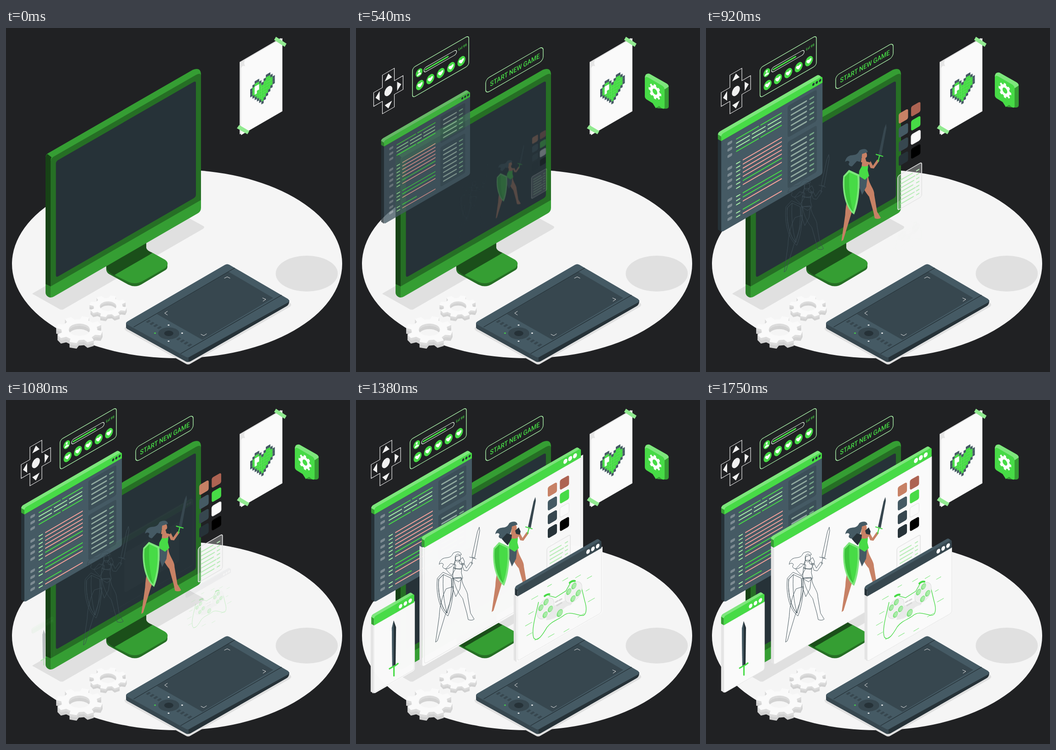
Write an HTML page that moves like this. It is 748 px wide and 748 px high and loops after 1790 ms.

```html
<!DOCTYPE html>
<html lang="en">
<head>
<meta charset="utf-8">
<title>Game design</title>
<style>
  html, body { margin: 0; width: 100%; height: 100%; overflow: hidden; background: #202123; }
  svg { display: block; width: 100vw; height: 100vh; }
  text { font-family: Roboto, "Liberation Sans", sans-serif; font-weight: 500; }
  .sketch * { fill: none; stroke: #3c4c54; stroke-width: .9; }
</style>
</head>
<body>
<svg id="stage" viewBox="0 0 748 748"></svg>
<script>
const GREEN = '#47db46', LIGHT = '#7ee67d', PALE = '#a9f0a8', MID = '#359e33', DEEP = '#266f25';
const SLATE = '#455a64', STEEL = '#37474f', INK = '#263238', SKIN = '#c78165';
const PAPER = '#fafafa', GREY = '#e0e0e0', RIM = '#e6e6e6';
const LOOP = 1790;
const SNAP = [.36, 0, .3, 1.6], SOFT = [.4, 0, .4, 1.4];

const path = (d, fill, more = '') => `<path d="${d}" fill="${fill}" ${more}/>`;
const stroke = (d, color, w = 1) => path(d, 'none', `stroke="${color}" stroke-width="${w}" stroke-linecap="round" stroke-linejoin="round"`);
const rect = (x, y, w, h, fill, r = 0, more = '') => `<rect x="${x}" y="${y}" width="${w}" height="${h}" rx="${r}" fill="${fill}" ${more}/>`;
const oval = (x, y, rx, ry, fill, more = '') => `<ellipse cx="${x}" cy="${y}" rx="${rx}" ry="${ry}" fill="${fill}" ${more}/>`;
const disc = (x, y, r, fill) => oval(x, y, r * .866, r, fill);
const list = (n, make) => Array.from({ length: n }, (_, i) => make(i)).join('');
const move = (x, y, body) => `<g transform="translate(${x} ${y})">${body}</g>`;
// Wall plane rising to the right; x stays in screen pixels
const iso = (x, y, body) => `<g transform="matrix(1 -.577 0 1 ${x} ${y})">${body}</g>`;

// A part fades in while it slides from [dx, dy] or zooms around a centre
const actors = [];
function actor(body, how) {
  actors.push({ span: 750, curve: SNAP, ...how });
  return `<g id="part${actors.length - 1}">${body}</g>`;
}
const slideIn = (order, slide, body) => actor(body, { at: 115 + order * 30, span: 640, slide });
const growIn = (zoom, body) => actor(body, { at: 880, span: 700, curve: SOFT, zoom });

function gear(r, hole, turn = 0) {
  const n = 8, pts = [];
  for (let i = 0; i < n; i++)
    for (const [a, k] of [[-.31, .77], [-.2, 1], [.2, 1], [.31, .77]]) {
      const t = (i + a + turn) * 2 * Math.PI / n;
      pts.push((r * k * Math.cos(t)).toFixed(1) + ' ' + (r * k * Math.sin(t)).toFixed(1));
    }
  return `M${pts.join('L')}ZM${hole} 0A${hole} ${hole} 0 1 0 ${-hole} 0A${hole} ${hole} 0 1 0 ${hole} 0Z`;
}

function floorGear(x, y, r, hole, depth) {
  const d = gear(r, hole, .35);
  return list(depth + 1, i => {
    const fill = i == depth ? PAPER : i > depth / 2 ? '#dcdcdc' : '#d2d2d2';
    return `<g transform="translate(${x} ${y + depth - i}) scale(1 .577)">${path(d, fill, 'fill-rule="evenodd"')}</g>`;
  });
}

function win(x, y, w, h, bar, d, [top, front, side], [face, edge], inside, grows) {
  const e = 1.155 * d;
  const front4 = `M0 ${bar}H${w}V${h - 5}q0 5-5 5H5q-5 0-5-5Z`;
  const panel = path(`M${-d} ${bar - e}L0 ${bar}V${h - 2}Q0 ${h} ${2 - d} ${h - e}Q${-d} ${h - e} ${-d} ${h - e - 3}Z`, edge) +
    path(front4, face);
  return iso(x, y,
    (grows ? growIn([w / 2, h / 2], panel) + stroke(front4, RIM) : panel) +
    path(`M${-d} ${5 - e}q0-5 5-5H${w - d - 4}Q${w - d} ${-e} ${w} 5L0 6Z`, top) +
    path(`M${-d} ${4 - e}L0 4V${bar}L${-d} ${bar - e}Z`, side) +
    path(`M0 ${bar}V5Q0 0 5 0H${w - 5}Q${w} 0 ${w} 5V${bar}Z`, front) + inside);
}
const dots = (x, y, r, gap, fill) => list(3, i => disc(x + i * gap, y, r, fill));
const sheet = (x, y, w, h, bar, colors, inside) => win(x, y, w, h, bar, 6, colors, [PAPER, '#e4e4e4'], inside, true);

const floor = oval(372, 513, 359, 205, '#f5f5f5') +
  path('M58 577L368 397 428 430Q434 433 428 437L126 611Q121 614 116 611L61 580Q56 578 58 577Z', GREY) +
  oval(654, 534, 67.5, 39, GREY);

const monitor =
  path('M218 515L305 465V478Q306 484 319 489L240 541Q222 533 218 526Z', '#1b4f1a') +
  path('M218 520Q221 532 238 539L319 492 351 512V519Q351 525 344 528L297 556Q282 566 266 558L224 535Q217 531 218 520Z', DEEP) +
  path('M236 537L319 489 346 504Q357 512 346 522L296 551Q282 558 268 553Z', MID) +
  path('M86 282Q86 275 92 272L406 91Q424 84 424 102V391Q424 399 417 403L104 584Q97 588 91 584 86 580 86 574Z', MID) +
  path('M86 282Q86 277 90 274L99 281Q97 284 97 288V562L86 557Z', '#174216') +
  path('M86 557L97 562V586Q86 584 86 574Z', '#2b8029') +
  path('M97 562V291Q97 284 103 280L413 102Q424 96 424 104V374Z', DEEP) +
  iso(108.5, 290, rect(0, 0, 304.5, 253, INK, 5));

const keys = (x, y) => list(4, i => path(`M${x + i * 8} ${y + i * 4.5}l7-4.5 4 2.4-7 4.5Z`, STEEL));
const tablet =
  path('M258 652L478 526 618 598Q623 603 616 607L401 730Q396 733 391 730L262 659Q257 656 258 652Z', GREY) +
  path('M261 641V650Q261 653 265 655L391 725Q396 727 401 725L610 605Q616 602 616 592Z', INK) +
  path('M261 641V650Q261 653 265 655L391 725Q394 727 397 726V715Z', STEEL) +
  path('M264 638L476 515Q481 512 486 515L613 589Q618 593 613 597L401 714Q396 718 391 715L264 645Q258 642 264 638Z', SLATE) +
  path('M484 530L581 587 427 678 328 622Z', STEEL) +
  stroke('M497 522L278 650M599 581L380 708', INK, 1.4) +
  stroke('M475 544l6-3 6 3M558 587l7 3-6 4M424 666l6 3 6-4M351 616l-6 4 6 4', GREY) +
  oval(354, 664, 23, 13, STEEL) + oval(354, 664, 10, 6, INK) +
  list(4, i => oval(353.5 + 29.5 * Math.cos(i * Math.PI / 2), 663.5 + 17.5 * Math.sin(i * Math.PI / 2), 2, 1.3, i == 2 ? GREEN : '#fff')) +
  keys(304, 639) + keys(370, 677);

function pixelHeart(cw, ch) {
  return list(11, x => {
    const d = Math.abs(x - 5), top = Math.abs(d - 2.5) - .5, end = 9 - d;
    return list(end - top + 1, i => {
      const y = top + i, shine = x + y < 7 && x > 1 && x < 4 && y > 1;
      const fill = d == 5 || y == top || y == end ? SLATE : shine ? '#fff' : GREEN;
      return rect(x * cw, y * ch, cw + .2, ch + .2, fill);
    });
  });
}
const poster =
  path('M508 74L597 22 601 24 516 229 508 231Z', GREY) +
  path('M511 82L520 69 601 22V181L511 233Z', PAPER) +
  path('M509 76L520 69Q516 75 520 83 513 81 511 88Z', RIM) +
  iso(531, 121.5, pixelHeart(4.85, 5.85)) +
  path('M583 26L587 19 610 34 606 41Z', '#91ea90') + path('M502 218L507 211 529 224 525 231Z', '#91ea90');

const pad = move(65, 137,
  iso(0, 0, path('M-13-42H13V-15H32V15H13V42H-13V15H-32V-15H-13Z', 'none', 'stroke="#f0f0f0" stroke-width="1.2"') + disc(0, 0, 10, '#f0f0f0')) +
  path('M0-38L-8-21 8-30ZM0 38L-8 31 8 21ZM-28 15L-19 0V21ZM28-15L19-20V0Z', '#f0f0f0'));

const heart = path('M0 5C-10-2-4-7 0-2.5 4-7 10-2 0 5Z', '#fff');
const hud = iso(117.5, 85,
  rect(0, 2, 122.5, 65, 'none', 6, `stroke="${PALE}" stroke-width="1.4"`) +
  disc(14.5, 20.5, 8.5, GREEN) + disc(14.5, 17.5, 2.5, '#fff') + path('M10 26q0-5 4.5-5t4.5 5Z', '#fff') +
  rect(25, 17, 71, 10, 'none', 5, 'stroke="#e6f5e6" stroke-width="1.2"') + stroke('M29 22H77', GREEN, 3.5) +
  `<text transform="matrix(.866 0 0 1 100 22)" font-size="8" fill="${GREEN}">Lvl 99</text>` +
  list(5, i => move(16.5 + i * 22.5, 48.5, disc(0, 0, 10, GREEN) + heart)));

const start = iso(282, 104,
  rect(0, 0, 125, 31, 'none', 8, `stroke="${PALE}" stroke-width="1.4"`) +
  `<text transform="matrix(.866 0 0 1 9.5 21.3)" font-size="14.8" fill="${GREEN}">START NEW GAME</text>`);

const bubble =
  path('M628 107Q628 95 638 97L675 118Q680 121 680 128V168Q680 173 673 173L655 172 650 150Z', MID) +
  path('M628 107Q628 95 638 97L675 118Q680 121 680 125L671 131 630 106Z', LIGHT) +
  path('M628 108Q629 102 635 105L666 123Q671 126 671 133V170Q671 175 665 172L659 167 652 172 645 161 632 153Q628 150 628 146Z', GREEN) +
  `<g transform="matrix(.866 .5 0 1 650 136)">${path(gear(16, 6), '#fff', 'fill-rule="evenodd"')}</g>`;

function codeRow(kind, y) {
  const dash = (a, b, color) => stroke(`M${a} ${y}H${b}`, color, 2.2);
  if (kind == '.') return '';
  if (kind == 'g') return dash(32, 78, GREEN) + dash(83, 126, GREEN);
  if (kind == 'l') return list(3, i => dash(32 + i * 33, 59 + i * 33, PALE));
  return dash(32, 39, PALE) + dash(46, kind == 's' ? 80 : 126, kind == 'p' ? '#f5a09a' : GREEN);
}
const notes = (y, n) => rect(139, y, 61, n * 10.6 + 13, '#3c4f58', 4) +
  list(n, i => stroke(`M147 ${y + 12 + i * 10.8}h31`, '#91aaa0', 3.2) + stroke(`M186 ${y + 12 + i * 10.8}h7`, '#74a586', 3.2));
const code = win(40, 235, 212, 205, 14, 7, [LIGHT, GREEN, MID], [SLATE, INK],
  dots(193, 6.5, 2.8, 7, INK) +
  [...'gllg..pppppkp.kkp.sp'].map((kind, i) => codeRow(kind, 28 + i * 8.6)).join('') +
  list(13, i => i % 5 == 3 ? '' : rect(13, 25 + i * 13.2, 10, 6, '#7c8b92', 2)) +
  notes(21, 5) + notes(96, 8));

const canvas = sheet(148, 301, 342, 274, 20, [LIGHT, GREEN, MID], dots(308, 9, 5, 10.5, '#fff'));

const fighter =
  path('M334 322L352 322C352 338 366 350 365 362L371 398 379 411Q374 415 366 412L363 398 354 366C346 356 338 345 334 322Z', SKIN) +
  path('M318 345L334 340C332 365 322 385 316 402L299 458 295 461 303 405C304 380 310 360 318 345Z', SKIN) +
  path('M331 322L351 320 348 345 339 362 331 340Z', SLATE) +
  path('M338 283L348 283 355 293 350 303 335 301Z', SKIN) +
  path('M351 290L357 290 362 300 371 287 376 289 364 306 357 305Z', SKIN) +
  path('M334 298Q341 304 352 300L351 310 354 322 345 330 332 322Z', GREEN) +
  oval(343.5, 278, 6, 8.5, SKIN) +
  path('M351 271C350 262 338 264 333 268 328 280 318 276 312 279 306 281 303 288 303 292 306 288 312 289 312 293 306 300 318 304 324 300 334 296 338 288 339 275Z', SLATE) +
  path('M317 302L328 290 339 293 338 302 330 316 322 308ZM346 284L354 277 358 286 356 293 348 291Z', INK) +
  path('M390 211L391 219 380 278 374 276 386 221Z', STEEL) +
  stroke('M369 276L383 280M376 279L373 291', GREEN, 2.2) +
  path('M311 309L333 319C335 345 332 380 322 404 304 392 295 355 299 322Z', LIGHT) +
  path('M312 314L329 322C331 345 328 376 320 398 307 386 299 353 302 324Z', GREEN) +
  path('M312 314L302 324C299 353 307 386 320 398 312 370 310 340 312 314Z', '#3cc43b');

const swatches = [SKIN, '#ad6352', SLATE, GREEN, STEEL, PAPER, INK, '#000'];
const artwork = fighter + `<g class="sketch">${move(-122, 65.5, fighter)}</g>` +
  iso(417, 189.6, swatches.map((c, i) =>
    rect(i % 2 * 26.3, (i >> 1) * 30, 20, 22, c, 4, c == PAPER ? `stroke="${GREY}"` : '')).join('')) +
  iso(415, 322, rect(0, 0, 51, 73, '#f5f5f5', 4, 'fill-opacity=".3" stroke="#e4e4e4" stroke-width="1.6"') +
    list(7, i => stroke(`M7 ${12 + i * 8.5}h${24 + i * 5 % 7}M40 ${12 + i * 8.5}h5`, '#b9edb8', 2.4)));

const noise = i => { const v = Math.sin(i * 127.1) * 43758.5; return v - Math.floor(v); };
const sparks = iso(440, 450, list(14, i => {
  const a = i * Math.PI / 7, r = .85 + noise(i + 1) * .35;
  return stroke(`M${68 * r * Math.cos(a) - 6} ${52 * r * Math.sin(a)}h${7 + noise(i + 40) * 8}`, '#8be88a', 1.3);
}));
const button = (x, y, r) => move(x, y, iso(0, 0, disc(0, 0, r, '#7fe07e') + disc(.8, 0, r * .75, '#a8ecA7')));
const thumbs = (x, y) => move(x, y, iso(0, 0, oval(0, 0, 18, 20, '#f1f1f1', `stroke="${GREY}"`)) +
  list(4, i => button(10 * Math.cos(i * Math.PI / 2 + .1), 13.5 * Math.sin(i * Math.PI / 2 + .1), 6.3)));
const gamepad = sparks +
  path('M414 478Q420 450 436 445L462 432Q474 440 466 446 452 448 442 466 432 477 414 478Z', '#e9e9e9') +
  stroke('M411 427q5-4 10-4M464 399q5-5 11-4', GREEN, 4) +
  stroke('M398 440C392 468 382 500 388 516 396 525 406 510 416 493 426 480 438 478 450 469 462 458 476 466 488 468 500 470 501 454 496 438L489 409M420 426L434 430 456 416 465 400', GREEN, 1.3) +
  thumbs(413, 453) + thumbs(472, 419) + button(443, 463, 7.5) +
  stroke('M434 440l5-3M442 436l5-3M437 447l10-6', '#d6d6d6', 3);
const gameSheet = sheet(351, 409, 183, 159, 18, [SLATE, STEEL, INK], dots(154, 9, 4.6, 10.5, '#fff'));

const swordSheet = sheet(39, 471, 88, 166, 19, [LIGHT, GREEN, MID], dots(58, 10.5, 4.4, 10.5, '#fff'));
const sword = path('M82 481L87 495 86 575 79 579 78 497Z', INK) + path('M82 481L78 497 79 579 82 577Z', SLATE) +
  stroke('M73 583L80 579 86 576 91 572M82.5 578V598', GREEN, 3);

const stage = document.getElementById('stage');
stage.innerHTML = floor + monitor + floorGear(222, 605, 41, 18, 9) + floorGear(159.5, 656, 51, 23, 12) + tablet + poster +
  slideIn(0, [0, -60], start) + slideIn(1, [-50, 0], pad) + slideIn(2, [-69, 0], hud) + slideIn(3, [0, -90], bubble) +
  actor(code, { at: 250, zoom: [218, 325] }) +
  actor(canvas, { at: 1008, zoom: [316, 337] }) +
  actor(artwork, { at: 280, span: 930, curve: SOFT, zoom: [320, 328] }) +
  actor(gameSheet, { at: 1008, zoom: [440, 434] }) + growIn([440, 450], gamepad) +
  actor(swordSheet, { at: 1008, zoom: [80, 528] }) + growIn([82, 535], sword);
const nodes = actors.map((_, i) => document.getElementById('part' + i));

function ease(x, [x1, y1, x2, y2]) {
  if (x <= 0) return 0;
  if (x >= 1) return 1;
  const bez = (s, a, b) => 3 * s * (1 - s) * ((1 - s) * a + s * b) + s ** 3;
  let lo = 0, hi = 1;
  for (let i = 0; i < 24; i++) {
    const mid = (lo + hi) / 2;
    if (bez(mid, x1, x2) < x) lo = mid; else hi = mid;
  }
  return bez(lo, y1, y2);
}

function draw() {
  const t = performance.now() % LOOP;
  actors.forEach(({ at, span, curve, slide, zoom }, i) => {
    const p = ease((t - at) / span, curve), k = .5 + p / 2;
    nodes[i].setAttribute('opacity', Math.min(1, p));
    nodes[i].setAttribute('transform', slide
      ? `translate(${slide.map(v => v * (1 - p))})`
      : `translate(${zoom.map(v => v * (1 - k))}) scale(${k})`);
  });
  requestAnimationFrame(draw);
}
draw();
</script>
</body>
</html>
```
